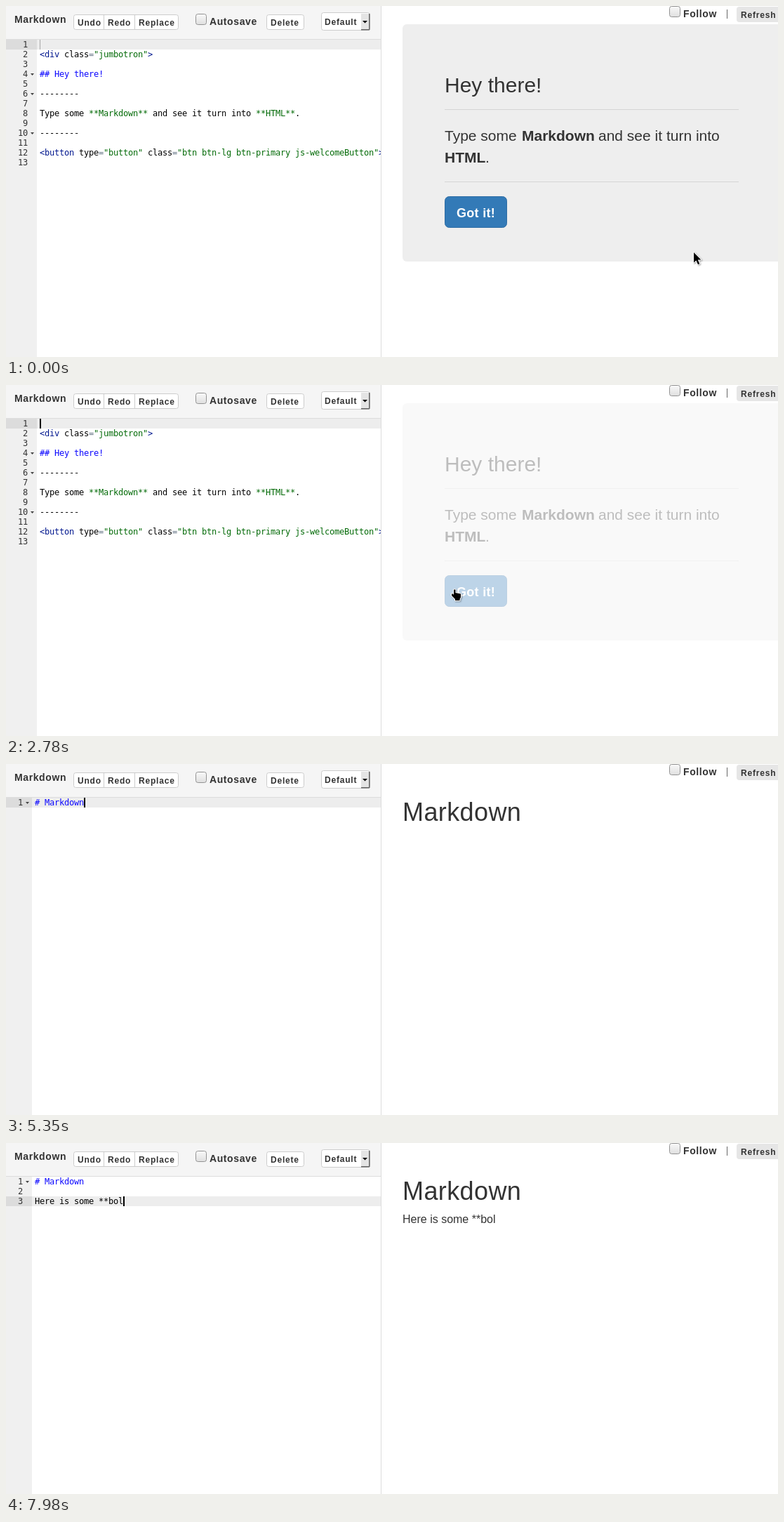
Animation of 1100 by 500 pixels, one loop 8 s. Source, as an HTML page with a canvas:

```html
<!DOCTYPE html>
<html lang="en">
<head>
<meta charset="utf-8">
<title>Live Markdown editor</title>
<style>
  html, body { margin: 0; width: 100%; height: 100%; overflow: hidden; background: #fff; }
  canvas { display: block; }
</style>
</head>
<body>
<canvas id="stage" width="1100" height="500"></canvas>
<script>
const ctx = document.getElementById('stage').getContext('2d');
const LOOP = 8000, CLICK = 2520, FADE_START = 2535, FADE = 400, CLEARED = FADE_START + FADE;
const SANS = '"Liberation Sans", Arial, sans-serif';
const MONO = '12px "DejaVu Sans Mono", monospace';
const CELL = 7, ROW = 14, TOP = 48, PANE = 534;
const TAG = '#00168e', STRING = '#036a07', HEADING = '#0c07ff', OPERATOR = '#687687', BLACK = '#000';

// Typed text with the times of its first and last key
const keyRuns = [
  ['#', 3990], [' ', 4120], ['M', 4400], ['ark', 4580, 4770], ['down', 5030, 5350],
  ['\n', 5710], ['\n', 5850], ['Here is ', 6070, 6690], ['s', 6820],
  ['ome ', 6910, 7090], ['**', 7450, 7580], ['bo', 7720, 7800], ['l', 7980]
];

// Each row of the welcome text is a list of [text, colour]
const welcome = [
  [],
  [['<div', TAG], [' class', BLACK], ['=', OPERATOR], ['"jumbotron"', STRING], ['>', TAG]],
  [],
  [['## Hey there!', HEADING]],
  [],
  [['--------', BLACK]],
  [],
  [['Type some ', BLACK], ['**Markdown**', STRING], [' and see it turn into ', BLACK],
   ['**HTML**', STRING], ['.', BLACK]],
  [],
  [['--------', BLACK]],
  [],
  [['<button', TAG], [' type', BLACK], ['=', OPERATOR], ['"button"', STRING], [' class', BLACK],
   ['=', OPERATOR], ['"btn btn-lg btn-primary js-welcomeButton"', STRING], ['>', TAG]],
  []
];

const easeOut = p => p * (2 - p);
const easeInOut = p => p * p * p * (p * (6 * p - 15) + 10);
const moves = [
  { from: 40, to: 210, steps: 5, x: 874, y: 319, ease: easeOut },
  { from: 1710, to: 2200, steps: 12, x: 638, y: 293, ease: easeInOut },
  { from: 2940, to: 3190, steps: 6, x: 690, y: 272, ease: easeInOut },
  { from: 3330, to: 3430, steps: 3, x: 922, y: 60, ease: p => p }
];

function rect(x, y, w, h, color) {
  ctx.fillStyle = color;
  ctx.fillRect(x, y, w, h);
}

function box(x, y, w, h, r, fill, border) {
  ctx.beginPath();
  ctx.roundRect(x + .5, y + .5, w - 1, h - 1, r);
  ctx.fillStyle = fill;
  ctx.fill();
  ctx.lineWidth = 1;
  ctx.strokeStyle = border;
  ctx.stroke();
}

function polygon(points, color) {
  ctx.beginPath();
  points.forEach(([x, y]) => ctx.lineTo(x, y));
  ctx.closePath();
  ctx.fillStyle = color;
  ctx.fill();
}

function text(str, x, y, font, color = '#333', spacing = 0) {
  ctx.font = `${font} ${SANS}`;
  ctx.letterSpacing = spacing + 'px';
  ctx.fillStyle = color;
  ctx.fillText(str, x, y);
}

const label = (str, x, y) => text(str, x, y, 'bold 14px', '#333', .6);
const caption = (str, x, y) => text(str, x, y, 'bold 12px', '#333', .8);

function mono(str, x, row, color) {
  ctx.font = MONO;
  ctx.letterSpacing = '0px';
  ctx.letterSpacing = CELL - ctx.measureText('0').width + 'px';
  ctx.fillStyle = color;
  ctx.fillText(str, x, TOP + row * ROW + 11);
}

function checkbox(x, y) {
  const shade = ctx.createLinearGradient(0, y, 0, y + 16);
  shade.addColorStop(0, '#fafafa');
  shade.addColorStop(1, '#dedede');
  box(x, y, 16, 16, 3, shade, '#929292');
}

function drawToolbar() {
  rect(0, 0, PANE, 47, '#f5f5f5');
  rect(0, 47, PANE, 1, '#ddd');
  label('Markdown', 12, 24);
  box(96, 12, 150, 22, 3, '#fff', '#ccc');
  rect(139, 12, 1, 22, '#ccc');
  rect(183, 12, 1, 22, '#ccc');
  caption('Undo', 102, 28);
  caption('Redo', 145, 28);
  caption('Replace', 189, 28);
  checkbox(270, 11);
  label('Autosave', 290, 27);
  box(371, 12, 54, 22, 3, '#fff', '#ccc');
  caption('Delete', 377, 28);
  box(449, 9, 70, 26, 3, '#fff', '#ccc');
  caption('Default', 454, 27);
  rect(506, 11, 12, 23, '#e4e4e4');
  rect(517, 11, 1.5, 23, '#666');
  rect(506, 33, 12, 1.5, '#666');
  polygon([[508, 21], [515, 21], [511.5, 24.5]], BLACK);
}

function drawEditor(rows, gutter, activeRow, foldRows) {
  ctx.save();
  ctx.beginPath();
  ctx.rect(0, TOP, PANE, 500 - TOP);
  ctx.clip();
  rect(0, TOP, gutter, 500 - TOP, '#f0f0f0');
  rect(0, TOP + activeRow * ROW, gutter, ROW, '#dcdcdc');
  rect(gutter, TOP + activeRow * ROW, PANE, ROW, '#ededed');
  rows.forEach((spans, row) => {
    const number = String(row + 1);
    mono(number, gutter - 13 - number.length * CELL, row, '#333');
    let x = gutter + 4;
    for (const [str, color] of spans) {
      mono(str, x, row, color);
      x += str.length * CELL;
    }
  });
  for (const row of foldRows) {
    const x = gutter - 9, y = TOP + row * ROW + 6;
    polygon([[x, y], [x + 5, y], [x + 2.5, y + 3]], '#444');
  }
  ctx.restore();
}

function drawPreviewBar() {
  checkbox(945, 0);
  label('Follow', 965, 16);
  rect(1027, 5, 1, 13, '#666');
  ctx.beginPath();
  ctx.roundRect(1041, 1, 70, 22, 4);
  ctx.fillStyle = '#e6e6e6';
  ctx.fill();
  caption('Refresh', 1047, 17);
}

function drawWelcomePage(hovered, opacity) {
  ctx.beginPath();
  ctx.roundRect(565, 26, 560, 338, 6);
  ctx.fillStyle = '#eee';
  ctx.fill();
  text('Hey there!', 625, 123, '30px');
  rect(625, 147, 419, 1, '#d5d5d5');
  text('Type some ', 625, 192, '21px');
  text('Markdown', 735, 192, 'bold 21px');
  text('and see it turn into', 844, 192, '21px');
  text('HTML', 625, 223, 'bold 21px');
  text('.', 683, 223, '21px');
  rect(625, 250, 419, 1, '#d5d5d5');
  box(625, 271, 89, 45, 6, hovered ? '#286090' : '#337ab7', hovered ? '#204d74' : '#2e6da4');
  text('Got it!', 642, 301, 'bold 18px', '#fff', .3);
  rect(PANE + 1, 26, 600, 340, `rgba(255, 255, 255, ${1 - opacity})`);
}

function typedText(t) {
  let typed = '';
  for (const [str, first, last = first] of keyRuns) {
    const gap = (last - first) / Math.max(1, str.length - 1);
    [...str].forEach((ch, i) => { if (t >= first + gap * i - .01) typed += ch; });
  }
  return typed;
}

function drawTypedPage(lines) {
  const [first, , body = ''] = lines;
  if (first === '#') text('#', 565, 44, '16px');
  text(first.slice(2), 565, 81, '36px', '#333', .4);
  text(body, 565, 114, '16px');
}

function pointerAt(t) {
  let x = 980, y = 351;
  for (const m of moves) {
    if (t < m.from) break;
    const step = Math.floor((t - m.from) / (m.to - m.from) * (m.steps - 1) + .001) + 1;
    const p = m.ease(Math.min(1, step / m.steps));
    x += (m.x - x) * p;
    y += (m.y - y) * p;
  }
  return { x: Math.round(x), y: Math.round(y) };
}

const arrow = new Path2D('M0 0V14.5L3.4 11.4L6 17.2L8.3 16.2L5.8 10.5H10.4Z');
const hand = new Path2D('M0 -1.5H2.5V3L10 4.5V9.5L8.5 12V14H2V12L-3 7V4.5H-1L0 6Z');

function drawPointer({ x, y }, shape) {
  ctx.save();
  ctx.translate(x, y);
  ctx.lineJoin = 'round';
  ctx.shadowColor = 'rgba(0, 0, 0, .35)';
  ctx.shadowBlur = 2;
  ctx.shadowOffsetX = ctx.shadowOffsetY = 1;
  ctx.lineWidth = 2;
  ctx.strokeStyle = '#fff';
  ctx.stroke(shape);
  ctx.shadowColor = 'transparent';
  ctx.fillStyle = BLACK;
  ctx.fill(shape);
  ctx.restore();
}

function draw(t) {
  rect(0, 0, 1100, 500, '#fff');
  drawToolbar();
  const pointer = pointerAt(t);
  const overButton = t < CLEARED && pointer.x >= 625 && pointer.x < 714 &&
    pointer.y >= 271 && pointer.y < 316;

  if (t < CLEARED) {
    drawEditor(welcome, 44, 0, [3, 5, 9]);
    if (t < CLICK) rect(48, TOP, 1, ROW, '#a8a8a8');
    else rect(48, TOP, 2, ROW, BLACK);
    const p = Math.max(0, (t - FADE_START) / FADE);
    drawWelcomePage(overButton && t < CLICK, .5 + .5 * Math.cos(Math.PI * p));
  } else {
    const lines = typedText(t).split('\n');
    const row = lines.length - 1;
    const spans = lines.map(line => [[line, /^# \S/.test(line) ? HEADING : BLACK]]);
    drawEditor(spans, 37, row, lines[0].startsWith('# ') ? [0] : []);
    if (t < 3330 || t >= 3800) rect(41 + lines[row].length * CELL, TOP + row * ROW, 2, ROW, BLACK);
    drawTypedPage(lines);
  }

  rect(PANE, 0, 1, 500, '#ddd');
  drawPreviewBar();
  if (t < 3470) drawPointer(pointer, overButton ? hand : arrow);
}

const start = performance.now();
function frame() {
  draw((performance.now() - start) % LOOP);
  requestAnimationFrame(frame);
}
frame();
</script>
</body>
</html>
```
